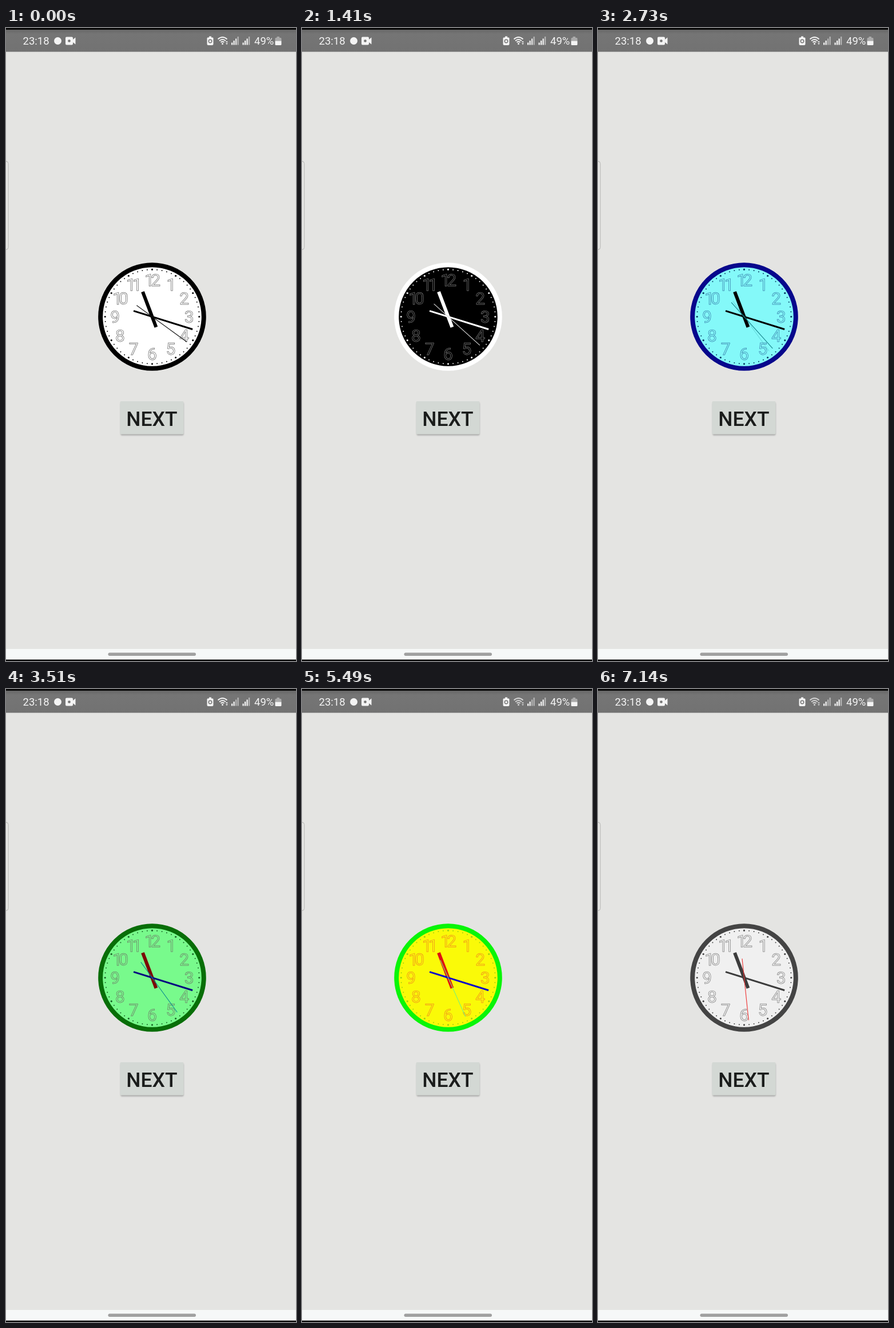
An HTML page for the animation above (7530 ms loop, 507 by 1104 pixels).

```html
<!DOCTYPE html>
<html lang="en">
<head>
<meta charset="utf-8">
<title>Clock styles</title>
<style>
  html, body { margin: 0; width: 100%; height: 100%; overflow: hidden; background: #e4e4e2; }
  svg { display: block; width: 507px; height: 1104px; font-family: Roboto, sans-serif; }
  #ring { fill: var(--face); stroke: var(--ring); stroke-width: 8; }
  #dots { fill: var(--dots); }
  #digits { fill: none; stroke: var(--digits); stroke-width: .75; stroke-opacity: .75; font-size: 30px; text-anchor: middle; }
  #hour { stroke: var(--hour); stroke-width: 6; }
  #minute { stroke: var(--minute); stroke-width: 3; }
  .second { stroke: var(--second); stroke-width: 1.1; }
</style>
</head>
<body>
<svg viewBox="0 0 507 1104">
  <defs>
    <linearGradient id="bar" x2="0" y2="1">
      <stop offset="0" stop-color="#686868"/>
      <stop offset=".2" stop-color="#757575"/>
      <stop offset="1" stop-color="#727272"/>
    </linearGradient>
    <filter id="soft" x="-10%" y="-10%" width="120%" height="130%"><feGaussianBlur stdDeviation="1.2"/></filter>
  </defs>
  <rect width="507" height="1104" fill="#e4e4e2"/>
  <rect width="507" height="4" fill="#080808"/>
  <rect y="3" width="507" height="38.5" fill="url(#bar)"/>

  <g fill="#f4f4f4">
    <text x="29.5" y="28.5" font-size="18.5">23:18</text>
    <circle cx="90.5" cy="22.5" r="6.5"/>
    <path d="M106 15.5h9q2 0 2 2v2.5l4.5-3.5v12l-4.5-3.500v2.500q0 2-2 2h-9q-2 0-2-2v-10q0-2 2-2z"/>
    <circle cx="110.500" cy="22.500" r="2.300" fill="#747474"/>
    <path d="M355 14.500h4v2h2q1.500 0 1.500 1.500v10q0 2-2 2h-7q-2 0-2-2v-10q0-1.500 1.500-1.500h2z"/>
    <circle cx="357" cy="23" r="2.700" fill="none" stroke="#747474" stroke-width="1.500"/>
    <g id="wifi">
      <g fill="none" stroke="#f4f4f4" stroke-width="1.700">
        <path d="M370.500 19.500Q378.500 12.500 386.500 19.500"/>
        <path d="M373 22.500Q378.500 17.500 384 22.500"/>
        <path d="M375.500 25Q378.500 22.500 381.500 25"/>
      </g>
      <circle cx="378.500" cy="27.500" r="1.500"/>
      <path d="M384 25l2-2.500 2 2.500zM384 26.500h4l-2 2.500z"/>
    </g>
    <g id="signals"></g>
    <text x="434" y="28.500" font-size="18.500">49%</text>
    <path d="M473.500 15h4.500v2h2q1.500 0 1.500 1.500v4h-11v-4q0-1.500 1.500-1.500h1.500z" fill="#aaa"/>
    <path d="M470.500 22.500h11v6q0 1.500-1.500 1.500h-8q-1.500 0-1.500-1.500z"/>
  </g>

  <rect x="-12" y="232.500" width="16" height="154" rx="4" fill="#e8e8e6" stroke="#b2b2b0"/>

  <g id="clock" transform="translate(255.500 503.500)">
    <circle id="ring" r="90.300"/>
    <g id="dots"></g>
    <g id="digits"></g>
    <path id="hour" d="M0 19.500V-46.500" transform="rotate(339.200)"/>
    <path id="minute" d="M0 34V-74" transform="rotate(107.300)"/>
    <path id="next" class="second" d="M0 33.500V-74.500"/>
    <path id="now" class="second" d="M0 33.500V-74.500"/>
  </g>

  <rect x="200.500" y="653" width="110" height="57.500" rx="2" fill="#888" opacity=".65" filter="url(#soft)"/>
  <rect x="199.500" y="651" width="111" height="57.500" rx="2" fill="#d3d8d4"/>
  <text x="255" y="694" font-size="35.500" font-weight="500" text-anchor="middle" fill="#1a1c1b">NEXT</text>

  <rect y="1083" width="507" height="19" fill="#f6f8f8"/>
  <rect x="178.500" y="1089.500" width="153.500" height="5.500" rx="2.700" fill="#a0a0a0"/>
  <rect y="1101.500" width="507" height="3" fill="#080808"/>
</svg>
<script>
const LOOP = 7530;
const PARTS = ['face', 'ring', 'dots', 'digits', 'hour', 'minute', 'second'];

// start time, then one colour per part
const THEMES = [
  [0, '#fff', '#000', '#111', '#333', '#000', '#000', '#111'],
  [660, '#000', '#fff', '#eee', '#aaa', '#fff', '#fff', '#ddd'],
  [1470, '#fff', '#0808f5', '#2222b0', '#3a3ae0', '#000', '#000', '#222'],
  [2520, '#84f9f9', '#07078c', '#063c60', '#1c5490', '#000', '#000', '#16848c'],
  [3360, '#78fa8c', '#086e08', '#1c6428', '#6a4a5a', '#7c0808', '#080880', '#0c8c90'],
  [5130, '#fafa08', '#08f508', '#a0d010', '#ee5a28', '#e01010', '#0c0cc8', '#78f07c'],
  [6750, '#f0f0f0', '#444', '#484848', '#555', '#3c3c3c', '#3c3c3c', '#ee3030']
];
const FIRST_SECOND = 21;
const TICKS = [930, 2040, 2730, 3540, 4470, 5520, 6000, 6930];
const BLEND = 30;

const $ = id => document.getElementById(id);
function add(parent, tag, attrs, text = '') {
  const el = document.createElementNS('http://www.w3.org/2000/svg', tag);
  for (const key in attrs) el.setAttribute(key, attrs[key]);
  el.textContent = text;
  parent.append(el);
  return el;
}
const polar = (turn, r) => [r * Math.sin(turn * 2 * Math.PI), -r * Math.cos(turn * 2 * Math.PI)];

for (let i = 0; i < 60; i++) {
  const [cx, cy] = polar(i / 60, 82.300);
  add($('dots'), 'circle', { cx, cy, r: i % 5 ? 1 : 1.6 });
}
for (let n = 1; n <= 12; n++) {
  const [x, y] = polar(n / 12, 64.8);
  const wide = n > 9;
  add($('digits'), 'text', {
    x: x + (wide ? -2.3 : n === 1 ? 1 : 0), y: y + 10.8,
    'letter-spacing': wide ? -6 : 0
  }, n);
}
const fading = [];
for (const x of [394, 413.500]) {
  for (let i = 0; i < 4; i++) {
    const height = 4 + i * 3.500;
    const bar = add($('signals'), 'rect', { x: x + i * 3.500, y: 29.500 - height, width: 2.300, height });
    if (i === 3) bar.setAttribute('opacity', .5);
    else if (i === 2 && x < 400) fading.push(bar);
  }
}

const hand = (el, sec) => el.setAttribute('transform', `rotate(${sec * 6})`);

function draw(t) {
  const theme = THEMES.filter(row => row[0] <= t).pop();
  PARTS.forEach((part, i) => $('clock').style.setProperty('--' + part, theme[i + 1]));

  const passed = TICKS.filter(at => at + BLEND <= t).length;
  const sec = FIRST_SECOND + passed;
  hand($('now'), sec);
  hand($('next'), sec + 1);
  $('next').setAttribute('opacity', TICKS[passed] <= t ? .25 : 0);

  for (const bar of fading) bar.setAttribute('opacity', t < 2460 ? .9 : .5);
  $('wifi').setAttribute('opacity', t < 5100 ? 1 : .75);
}

const start = performance.now();
function frame() {
  draw((performance.now() - start) % LOOP);
  requestAnimationFrame(frame);
}
frame();
</script>
</body>
</html>
```
